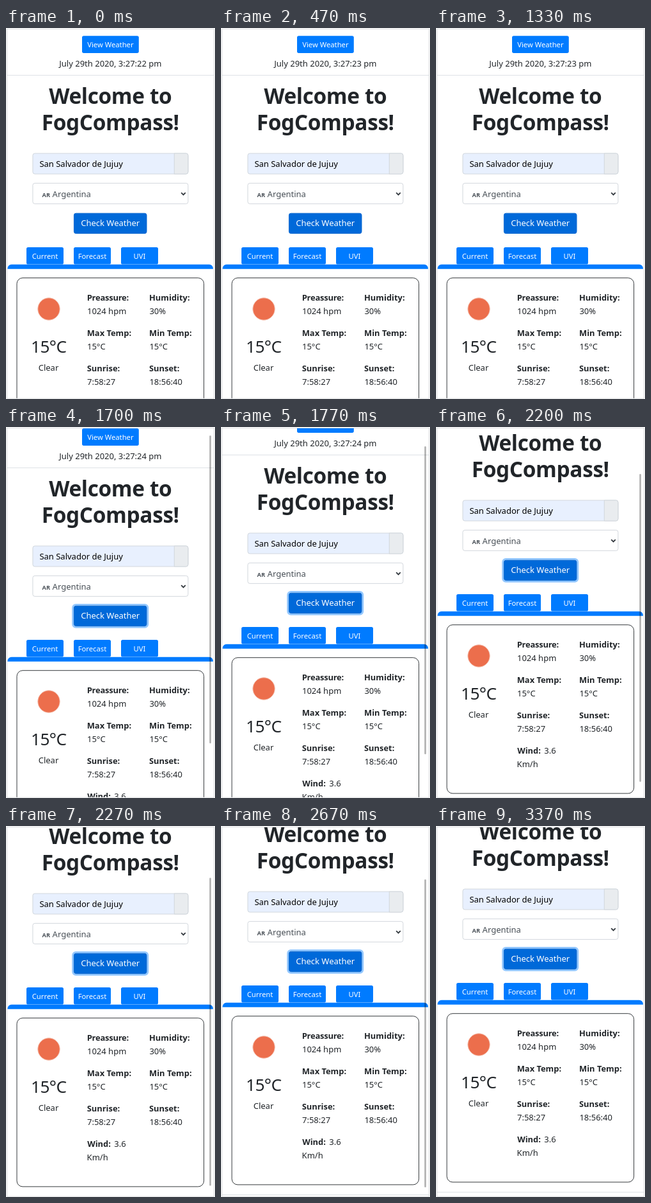
These frames come from a looping animation (327 px wide and 577 px high, 4360 ms). An HTML page:

```html
<!DOCTYPE html>
<html lang="en">
<head>
<meta charset="utf-8">
<title>Weather page</title>
<style>
  html, body { margin: 0; width: 100%; height: 100%; overflow: hidden; background: #fff; }
  svg { display: block; width: 100%; height: 100%; }
  text { font-family: "Noto Sans", "Open Sans", sans-serif; font-size: 13px; fill: #212529; white-space: pre; }
  .mid { text-anchor: middle; }
  .bold { font-weight: 700; font-size: 12.9px; }
  .title { font-weight: 700; font-size: 33.4px; letter-spacing: -.35px; }
  .temp { font-size: 26.2px; letter-spacing: -.6px; }
  .small { font-size: 11.25px; }
  .light { fill: #fff; }
  .black { fill: #000; }
  .field { fill: #495057; }
  .flag { font-size: 9.2px; font-weight: 600; fill: #495057; }
  .tight { letter-spacing: -.2px; }
</style>
</head>
<body>
<svg viewBox="0 0 327 577">
  <defs>
    <clipPath id="view"><rect x="2" y="2" width="323" height="574"/></clipPath>
  </defs>
  <g clip-path="url(#view)">
    <g id="page">
      <path d="M2 73.5H325M2 666.5H325" stroke="#dee2e6"/>

      <g stroke="#ced4da" stroke-width=".9">
        <rect x="41.9" y="195" width="243" height="32" rx="3.2" fill="#e8f0fe"/>
        <path d="M263.3 195H281.7a3.2 3.2 0 0 1 3.2 3.2V223.8a3.2 3.2 0 0 1 -3.2 3.2H263.3Z" fill="#e9ecef"/>
        <rect x="41.9" y="241.4" width="243" height="32" rx="3.2" fill="#fff"/>
      </g>
      <path d="M274.2 256.2l3.3 3.3l3.3 -3.3" fill="none" stroke="#343a40" stroke-width="1.8"/>

      <rect id="ring" x="104.6" y="286.4" width="117.2" height="35" rx="4.6" fill="none" stroke="#268fff" stroke-opacity=".5" stroke-width="2.8"/>
      <rect x="106.4" y="288.2" width="113.6" height="31.4" rx="3" fill="#0069d9" stroke="#0062cc" stroke-width=".9"/>

      <path d="M2.5 374.7V373.8a6 6 0 0 1 6 -6H318a6 6 0 0 1 6 6V374.7Z" fill="#007bff"/>
      <rect x="17" y="388.7" width="292.6" height="262.2" rx="9" fill="#fff" stroke="#212529" stroke-width=".9"/>
      <circle cx="67" cy="437" r="17.2" fill="#ec6e4c" stroke="#f5bfae"/>
      <g id="buttons" fill="#007bff"></g>
      <g id="labels"></g>
    </g>
    <rect id="thumb" x="318.2" width="2.8" height="479" rx="1.4"/>
  </g>
  <rect x="1.5" y="1.5" width="324" height="574.7" fill="none" stroke="#dcdee0"/>
</svg>
<script>
const LOOP = 4360;
const $ = id => document.getElementById(id);

function add(parent, tag, attrs, content = '') {
  const el = document.createElementNS('http://www.w3.org/2000/svg', tag);
  for (const name in attrs) el.setAttribute(name, attrs[name]);
  el.textContent = content;
  parent.append(el);
  return el;
}

const label = (x, y, content, cls = '') => add($('labels'), 'text', { x, y, class: cls }, content);

function button(x, y, width, height, content, baseline) {
  add($('buttons'), 'rect', { x, y, width, height, rx: 2.6 });
  label(x + width / 2, baseline, content, 'mid small light');
}

button(119, 12.3, 88.8, 26.6, 'View Weather', 30);
['Current', 'Forecast', 'UVI'].forEach((name, i) => button(32 + 74 * i, 341, 58, 26.5, name, 359));

const date = label(163.4, 60, '', 'mid');
label(163.3, 118, 'Welcome to', 'mid title');
label(163.3, 159.3, 'FogCompass!', 'mid title');
label(52.4, 216, 'San Salvador de Jujuy', 'black');
label(56.6, 263, 'AR', 'flag');
label(72.6, 263, 'Argentina', 'field');
label(163.2, 308.3, 'Check Weather', 'mid light');
label(66.7, 504.7, '15°C', 'mid temp');
label(66.5, 533, 'Clear', 'mid');

// Two columns of readings, one row every 55 px
[
  ['Preassure:', '1024 hpm', 'Humidity:', '30%'],
  ['Max Temp:', '15°C', 'Min Temp:', '15°C'],
  ['Sunrise:', '7:58:27', 'Sunset:', '18:56:40'],
].forEach(([nameA, valueA, nameB, valueB], i) => {
  const y = 424 + 55 * i;
  label(126.7, y, nameA, i ? 'bold' : 'bold tight');
  label(127, y + 21, valueA);
  label(224, y, nameB, 'bold');
  label(224.4, y + 21, valueB);
});
label(127.2, 589, 'Wind:', 'bold');
label(169.3, 589, '3.6');
label(126.6, 610, 'Km/h');

// [time, offset]: three wheel ticks, each eased and shown in hard steps
const scrollSteps = [
  [0, 0],
  [1670, 3], [1700, 10], [1730, 19], [1770, 30], [1800, 38], [1830, 44],
  [2100, 52], [2130, 62], [2200, 81], [2230, 87], [2270, 90],
  [2670, 93], [2700, 95], [2770, 96.5], [2800, 97],
];

const scrollAt = t => scrollSteps.findLast(([start]) => t >= start)[1];

function ringAlpha(t) {
  if (t < 1330) return 0;
  return t < 1430 ? 0.06 : 1;
}

function thumbAlpha(t) {
  if (t < 1670) return 0;
  if (t < 3100) return 1;
  return Math.max(0, 1 - (Math.floor((t - 3100) / 45) + 1) / 7);
}

function draw(t) {
  const y = scrollAt(t);
  const second = 22 + (t >= 470) + (t >= 1430);
  date.textContent = `July 29th 2020, 3:27:${second} pm`;
  $('page').setAttribute('transform', `translate(0 ${-y})`);
  $('ring').setAttribute('opacity', ringAlpha(t));
  $('thumb').setAttribute('y', 4.8 + 0.842 * y);
  $('thumb').setAttribute('opacity', 0.29 * thumbAlpha(t));
}

const begin = performance.now();
function tick() {
  draw((performance.now() - begin) % LOOP);
  requestAnimationFrame(tick);
}
tick();
</script>
</body>
</html>
```
